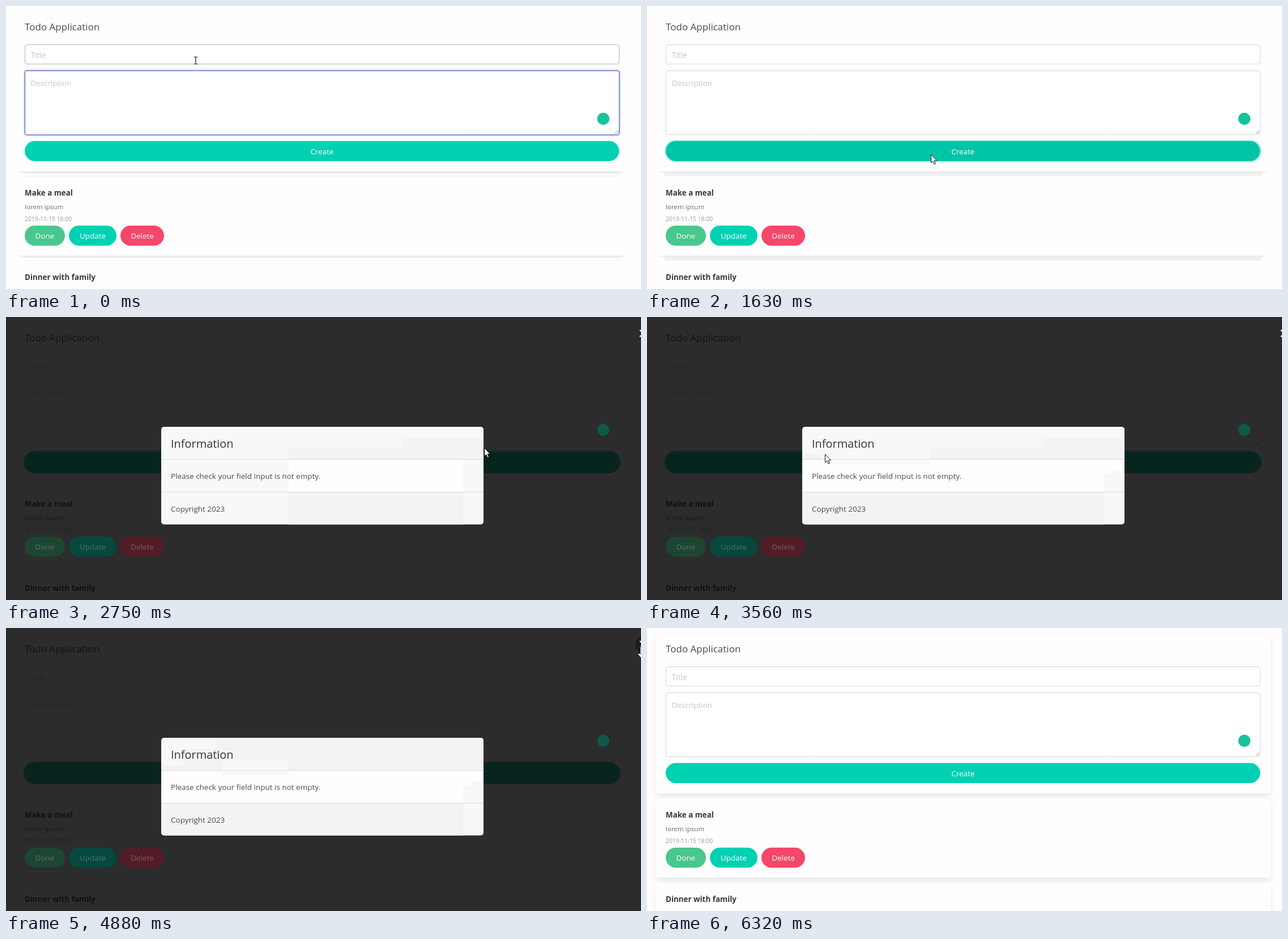
These frames come from a looping animation (1121x500 px, 6.6 s). An HTML page with a canvas:

```html
<!DOCTYPE html>
<html lang="en">
<head>
<meta charset="utf-8">
<title>Todo</title>
<style>
html, body { margin: 0; width: 100%; height: 100%; overflow: hidden; background: #fefefe; }
canvas { display: block; }
</style>
</head>
<body>
<canvas id="stage" width="1121" height="500"></canvas>
<script>
const W = 1121, H = 500, LOOP = 6600;
const CLICK = 1500, OPEN = 1780, CLOSE = 5300;
const ctx = document.getElementById('stage').getContext('2d');
const TEAL = '#00d1b2', FOCUS = '#485fc7';

// time, x, y, shape: the pointer holds each place until the next
const pointer = [
  [0, 335, 96, 'beam'], [260, 338, 104, 'beam'], [390, 352, 128, 'beam'],
  [510, 385, 165, 'beam'], [630, 430, 207, 'beam'], [750, 470, 241, 'beam'],
  [870, 494, 268, 'arrow'], [1010, 498, 269, 'arrow'], [1130, 500, 266, 'arrow'],
  [1250, 501, 262, 'arrow'], [2210, 500, 256, 'arrow'], [2360, 610, 300, 'arrow'],
  [2480, 796, 356, 'arrow'], [2630, 701, 215, 'arrow'], [2750, 844, 231, 'arrow'],
  [2900, 811, 252, 'arrow'], [3050, 520, 259, 'arrow'], [3170, 330, 330, 'arrow'],
  [3290, 244, 379, 'arrow'], [3410, 261, 296, 'arrow'], [3560, 314, 242, 'arrow'],
  [3710, 371, 215, 'arrow'], [3830, 850, 150, 'arrow'], [3950, 1009, 85, 'arrow'],
  [4070, 983, 102, 'arrow'], [4220, 1000, 91, 'arrow'], [4370, 1089, 51, 'arrow'],
  [4520, 1109, 47, 'arrow'], [4640, 1114, 40, 'hand'], [4760, 1116, 35, 'hand'],
  [4880, 1118, 33, 'hand'], [5300, 1119, 32, 'arrow'], [5600, 1106, 80, 'arrow'],
  [5720, 1096, 170, 'arrow'], [5840, 1084, 290, 'arrow'], [5960, 1076, 385, 'arrow'],
  [6080, 1078, 470, 'arrow'], [6200, 0, 0, 'none']
];

// time, left, top, right, bottom: parts of the dialog that turn to their final tint
const tinted = [
  [2210, 499, 255, 511, 279], [2360, 499, 233, 622, 320], [2480, 499, 233, 807, 375],
  [2630, 700, 214, 807, 375], [2750, 700, 214, 855, 250], [2900, 807, 230, 855, 271],
  [3050, 508, 254, 821, 278], [3170, 274, 261, 807, 375], [3560, 260, 242, 325, 261],
  [3710, 312, 214, 382, 261], [3830, 371, 150, 862, 233]
];

function rect(x, y, right, bottom, color) {
  ctx.fillStyle = color;
  ctx.fillRect(x, y, right - x, bottom - y);
}

function rounded(x, y, right, bottom, r) {
  ctx.beginPath();
  ctx.roundRect(x, y, right - x, bottom - y, r);
}

function text(str, x, y, size, color, weight = 400, align = 'left') {
  ctx.font = `${weight} ${size}px "Open Sans", "Noto Sans", sans-serif`;
  ctx.textAlign = align;
  ctx.fillStyle = color;
  ctx.fillText(str, x, y);
}

function line(points, color, width = 1) {
  ctx.beginPath();
  points.forEach(([x, y]) => ctx.lineTo(x, y));
  ctx.strokeStyle = color;
  ctx.lineWidth = width;
  ctx.stroke();
}

function circle(x, y, r, color) {
  ctx.beginPath();
  ctx.arc(x, y, r, 0, Math.PI * 2);
  ctx.fillStyle = color;
  ctx.fill();
}

function button(label, x, y, right, color) {
  rounded(x, y, right, y + 35.5, 17.75);
  ctx.fillStyle = color;
  ctx.fill();
  text(label, (x + right) / 2, y + 23.2, 13.5, '#fff', 400, 'center');
}

function field(y, bottom, state) {
  if (state === 'focus') {
    rounded(32, y - 1, 1084, bottom + 1, 4.5);
    ctx.strokeStyle = 'rgba(72,95,199,.28)';
    ctx.lineWidth = 2;
    ctx.stroke();
  }
  rounded(33.5, y + .5, 1082.5, bottom - .5, 3.5);
  ctx.fillStyle = '#fff';
  ctx.fill();
  ctx.strokeStyle = { focus: FOCUS, hover: '#b5b5b5', idle: '#d9d9d9' }[state];
  ctx.lineWidth = 1;
  ctx.stroke();
  if (state === 'idle') line([[36, y + .5], [1080, y + .5]], '#cfcfcf');
}

function card(y, bottom) {
  ctx.save();
  ctx.shadowColor = 'rgba(10,10,10,.1)';
  ctx.shadowBlur = 14;
  ctx.shadowOffsetY = 7;
  rounded(16.5, y + 2, 1099, bottom - 2, 5);
  ctx.fillStyle = '#fefefe';
  ctx.fill();
  ctx.restore();
  rounded(14.5, y, 1101, bottom, 5);
  ctx.fillStyle = '#fefefe';
  ctx.fill();
  ctx.strokeStyle = 'rgba(10,10,10,.02)';
  ctx.lineWidth = 1;
  ctx.stroke();
}

function divider(y, filled) {
  if (filled) rect(31, y + 1, 1085, y + 8.5, '#f1f1f1');
  rect(20, y, 1097, y + 1, '#efefef');
  rect(26, y + 1, 1091, y + 2, '#ebebeb');
  rect(33, y + 2, 1083, y + 4, filled ? '#eeeeee' : '#ebebeb');
  if (!filled) rect(33, y + 8, 1083, y + 9, '#efefef');
}

function actions() {
  button('Done', 33, 388, 104, '#48c78e');
  button('Update', 111, 388, 195, TEAL);
  button('Delete', 202, 388, 279, '#f54768');
}

function badge() {
  circle(1054.5, 199.3, 10.7, '#15c39a');
}

function page(t) {
  const modal = t >= OPEN && t < CLOSE;
  rect(0, 0, W, H, '#fefefe');
  if (t >= CLOSE) {
    card(9, 292);
    card(300.5, 441.5);
    card(450, 600);
  } else if (!modal) {
    divider(292, t >= CLICK);
    divider(441, t >= CLICK);
  }

  text('Todo Application', 33, 43, 17, '#4a4a4a');
  if (!modal) {
    field(68, 103, t < 140 ? 'hover' : t < CLICK ? 'focus' : 'idle');
    field(114, 228, t < 140 ? 'focus' : t >= 390 && t < 870 ? 'hover' : 'idle');
  }
  text('Title', 43.5, 92, 13.6, '#c6c6c6');
  text('Description', 43.5, 141, 13.4, '#c6c6c6');
  if (t >= 140 && t < 1010) rect(44, 78, 45, 95, '#444');
  line([[1074.5, 226], [1081, 219.5]], '#888');
  line([[1078, 226], [1081, 223]], '#888');
  badge();

  if (t >= CLICK && t < CLOSE) {
    rounded(32, 237.5, 1084, 275, 18.75);
    ctx.strokeStyle = modal ? TEAL : 'rgba(0,209,178,.3)';
    ctx.lineWidth = 2;
    ctx.stroke();
  }
  button('Create', 33, 238.5, 1082.5, t >= 870 && t < CLOSE ? '#00c4a7' : TEAL);

  text('Make a meal', 33, 335, 13.4, '#363636', 700);
  text('lorem ipsum', 33, 359, 11.6, '#6c6c6c');
  text('2019-11-15 18:00', 33, 380, 10.35, '#999');
  actions();
  text('Dinner with family', 33, 484, 13.4, '#363636', 700);
  text('lorem ipsum', 33, 508, 11.6, '#6c6c6c');
}

function dialog(t) {
  rect(0, 0, W, H, 'rgba(10,10,10,.86)');
  ctx.globalAlpha = .2;
  actions();
  ctx.globalAlpha = .35;
  badge();
  ctx.globalAlpha = 1;

  ctx.save();
  rounded(274, 194, 843, 366.5, 5);
  ctx.clip();
  rect(274, 194, 843, 367, '#f8f8f8');
  ctx.beginPath();
  for (const [start, x, y, right, bottom] of tinted) {
    if (t >= start) ctx.rect(x, y, right - x, bottom - y);
  }
  ctx.save();
  ctx.clip();
  rect(274, 194, 843, 251, '#f3f3f3');
  rect(274, 251, 843, 309, '#fefefe');
  rect(274, 309, 843, 367, '#f3f3f3');
  ctx.restore();
  rect(274, 251, 843, 252, '#d9d9d9');
  rect(274, 309, 843, 310, '#d9d9d9');
  ctx.restore();
  text('Information', 291, 231, 19.9, '#363636');
  text('Please check your field input is not empty.', 291, 286, 13.5, '#4a4a4a');
  text('Copyright 2023', 291, 344, 13.5, '#4a4a4a');

  if (t >= 4640) circle(1125, 29, 14, '#1b1b1b');
  line([[1119, 23], [1131, 35]], '#fff', 2);
  line([[1119, 35], [1131, 23]], '#fff', 2);
}

const shapes = {
  arrow: [[0, 0], [0, 14.5], [3.3, 11.5], [5.6, 17], [8, 16], [5.7, 10.7], [10, 10.5]],
  hand: [[1, 0], [1, 13], [-1, 11], [-3, 13], [2, 19], [13, 19], [15, 8], [4, 6], [4, 0]]
};

function drawPointer(t) {
  const [, x, y, shape] = pointer.findLast(key => t >= key[0]);
  if (shape === 'none') return;
  ctx.save();
  ctx.translate(x, y);
  if (shape === 'beam') {
    rect(-.7, -6, .6, 7, '#222');
    rect(-3.5, -6.5, 3.5, -5.5, '#222');
    rect(-3.5, 6, 3.5, 7, '#222');
  } else {
    ctx.translate(.5, .5);
    ctx.beginPath();
    shapes[shape].forEach(([px, py]) => ctx.lineTo(px, py));
    ctx.closePath();
    ctx.fillStyle = '#fff';
    ctx.fill();
    ctx.strokeStyle = '#111';
    ctx.lineWidth = 1;
    ctx.stroke();
  }
  ctx.restore();
}

function frame() {
  const t = performance.now() % LOOP;
  page(t);
  if (t >= OPEN && t < CLOSE) dialog(t);
  drawPointer(t);
  requestAnimationFrame(frame);
}
frame();
</script>
</body>
</html>
```
